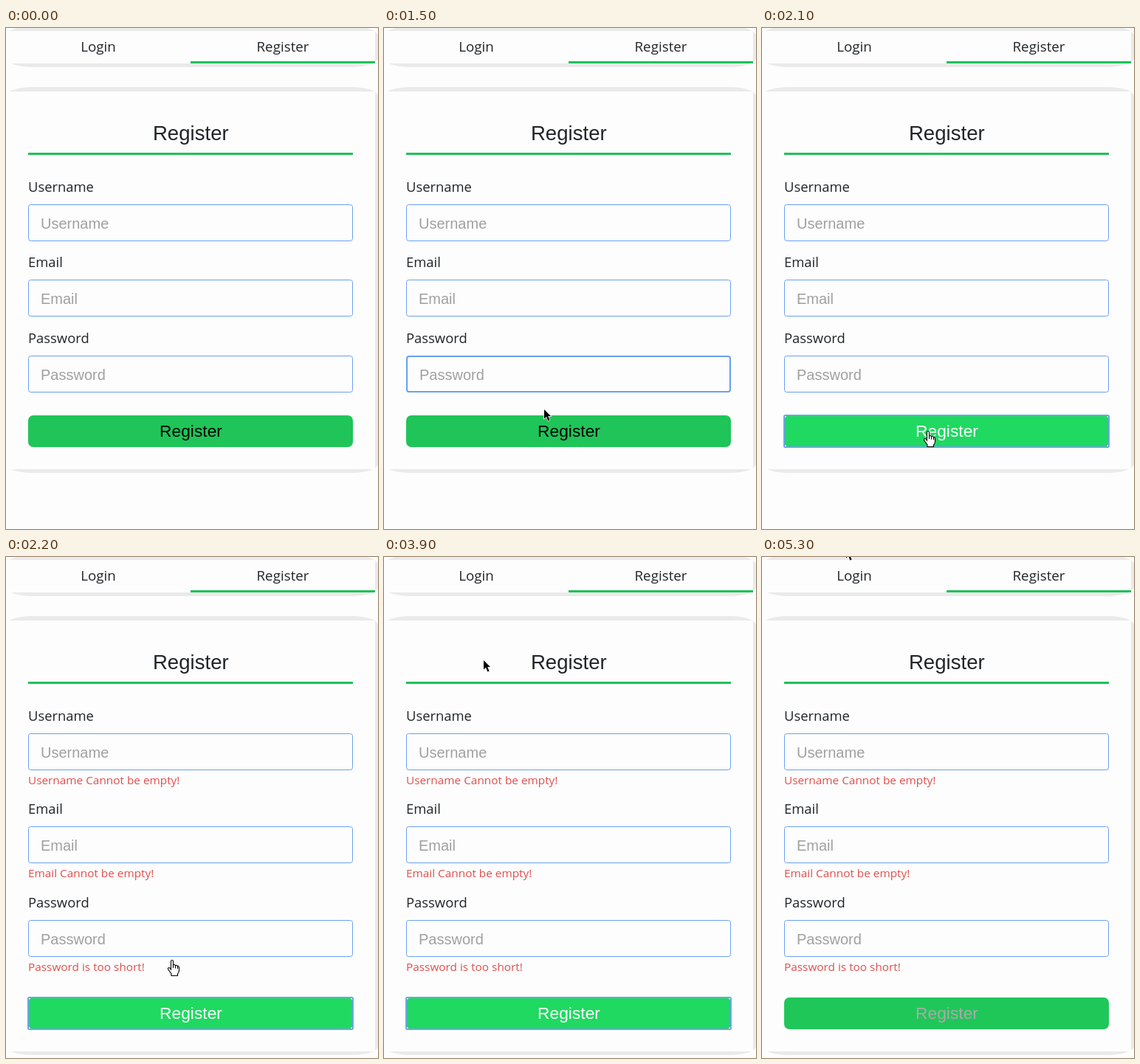
An HTML page that plays this animation: 504x679 px, repeating every 5400 ms.

```html
<!DOCTYPE html>
<html lang="en">
<head>
<meta charset="utf-8">
<title>Register form</title>
<style>
html, body { margin: 0; width: 100%; height: 100%; overflow: hidden; background: #fdfdfd; }
svg { display: block; }
text { font-family: "Open Sans", "Noto Sans", sans-serif; fill: #212529; }
.arial { font-family: "Liberation Sans", Arial, sans-serif; }
.mid { text-anchor: middle; }
</style>
</head>
<body>
<svg id="stage" width="504" height="679" viewBox="0 0 504 679"></svg>
<script>
const LOOP = 5400, STEP = 100;
const HOVER = 1500, FOCUS = 2100, FAIL = 2200, LEAVE = 3300, BLUR = 5300;
const FIELD_H = 50, BUTTON_H = 43;
const GREEN = '#1fc15a', BLUE = '#6a9ff5';
const stage = document.getElementById('stage');

// Where the pointer turns or rests: time, x, y
const path = [
  [0, 118, -20], [600, 140, 103], [800, 140, 103], [1100, 167, 329],
  [1500, 217, 517], [1700, 225, 546], [3200, 225, 546], [LEAVE, 215, 531],
  [3900, 135, 140], [4200, 131, 120], [4700, 114, -11], [LOOP, 114, -11]
];
const fields = [
  ['Username', 'Username Cannot be empty!'],
  ['Email', 'Email Cannot be empty!'],
  ['Password', 'Password is too short!']
];
const cursors = {
  arrow: '<path d="M0 0V12.5L3 9.8L5.4 15.4L7.6 14.4L5.2 9H9Z" stroke="#fff" stroke-width="1.4" paint-order="stroke"/>',
  beam: '<path d="M-2.5 -8.5H3.5M.5 -8.5V8.5M-2.5 8.5H3.5" fill="none" stroke="#111"/>',
  hand: '<path d="M-1.5 1.5Q0 -1 1.5 1.5V7Q3.5 5.5 4.5 7.8Q6.5 6.5 7.5 8.7Q9.5 8 9.5 10.5V14Q9.5 17 7.5 19V21.5H-1V19L-5.5 12.5Q-5.5 9.5 -3 11L-1.5 13ZM1.5 7V11M4.5 8V11.5M7.5 9V12" fill="#fff" stroke="#000" stroke-width="1.1"/>'
};

const clamp = v => Math.max(0, Math.min(1, v));
const lerp = (a, b, k) => a + (b - a) * k;
const mix = (a, b, k) => `rgb(${a.map((v, i) => Math.round(lerp(v, b[i], k)))})`;
const inside = (y, top, h) => y >= top && y < top + h;
const rect = (x, y, w, h, attrs) => `<rect x="${x}" y="${y}" width="${w}" height="${h}" ${attrs}/>`;
const text = (x, y, size, str, cls = '', fill = '') =>
  `<text x="${x}" y="${y}" font-size="${size}" class="${cls}"${fill && ` style="fill:${fill}"`}>${str}</text>`;

const card = (y, h) =>
  rect(0, y - 6, 504, h + 11, 'rx="36" ry="12" fill="#eaeaea"') +
  rect(0, y, 500, h, 'fill="#fdfdfd"');

// Each error line pushes everything below it down by 24
const layout = failed => ({
  tops: fields.map((_, i) => Math.floor(239 + i * (failed ? 126.5 : 102.5))),
  buttonY: failed ? 597 : 525
});

function pointerAt(t) {
  const i = path.findIndex(p => p[0] > t);
  const [a, b] = [path[i - 1], path[i]];
  const k = (t - a[0]) / (b[0] - a[0]);
  return [1, 2].map(n => Math.round(lerp(a[n], b[n], k)));
}

function cursorFor(y, t) {
  // The shape only updates once the pointer moves on the new layout
  const { tops, buttonY } = layout(t >= LEAVE);
  if (inside(y, buttonY, BUTTON_H)) return cursors.hand;
  return tops.some(top => inside(y, top, FIELD_H)) ? cursors.beam : cursors.arrow;
}

function field([name, error], top, hovered, failed) {
  const w = hovered ? 2 : 1;
  return text(30, top - 17, 18.4, name) +
    rect(30 + w / 2, top + w / 2, 440 - w, FIELD_H - w, `rx="3" fill="none" stroke="${BLUE}" stroke-width="${w}"`) +
    text(46 + w, top + 33, 20, name, 'arial', '#a0a0a0') +
    (failed ? text(30, top + 69, 15.35, error, '', '#df4f4d') : '');
}

function button(y, t) {
  const hover = clamp((t - HOVER) / 300) - clamp((t - BLUR + STEP) / 300);
  const focused = t >= FOCUS && t < BLUR;
  return rect(30, y, 440, BUTTON_H, `rx="7" fill="${mix([31, 197, 88], [31, 217, 97], hover ** 6)}"`) +
    (focused ? rect(30, y, 440, BUTTON_H, 'rx="1.5" fill="none" stroke="#6aa5e8" stroke-width="2"') : '') +
    text(250.5, y + 29, 22.8, 'Register', 'arial mid', mix([0, 0, 0], [255, 255, 255], hover));
}

function draw(t) {
  const failed = t >= FAIL;
  const { tops, buttonY } = layout(failed);
  const [x, y] = pointerAt(t);
  // Field highlights trail the pointer by one step
  const trailY = pointerAt(Math.max(0, t - STEP))[1];

  stage.innerHTML =
    card(4, 44) +
    rect(250, 45, 250, 3, `fill="${GREEN}"`) +
    text(125, 32, 18.8, 'Login', 'mid') +
    text(375, 32, 18.8, 'Register', 'mid') +
    card(86, buttonY - 13) +
    text(250.3, 152, 27.6, 'Register', 'arial mid') +
    rect(30, 169, 440, 3, `fill="${GREEN}"`) +
    fields.map((f, i) => field(f, tops[i], inside(trailY, tops[i], FIELD_H), failed)).join('') +
    button(buttonY, t) +
    `<g transform="translate(${x} ${y})">${cursorFor(y, t)}</g>`;
}

let last = -1;
function tick() {
  const t = Math.floor(performance.now() % LOOP / STEP) * STEP;
  if (t !== last) draw(last = t);
  requestAnimationFrame(tick);
}
tick();
</script>
</body>
</html>
```
